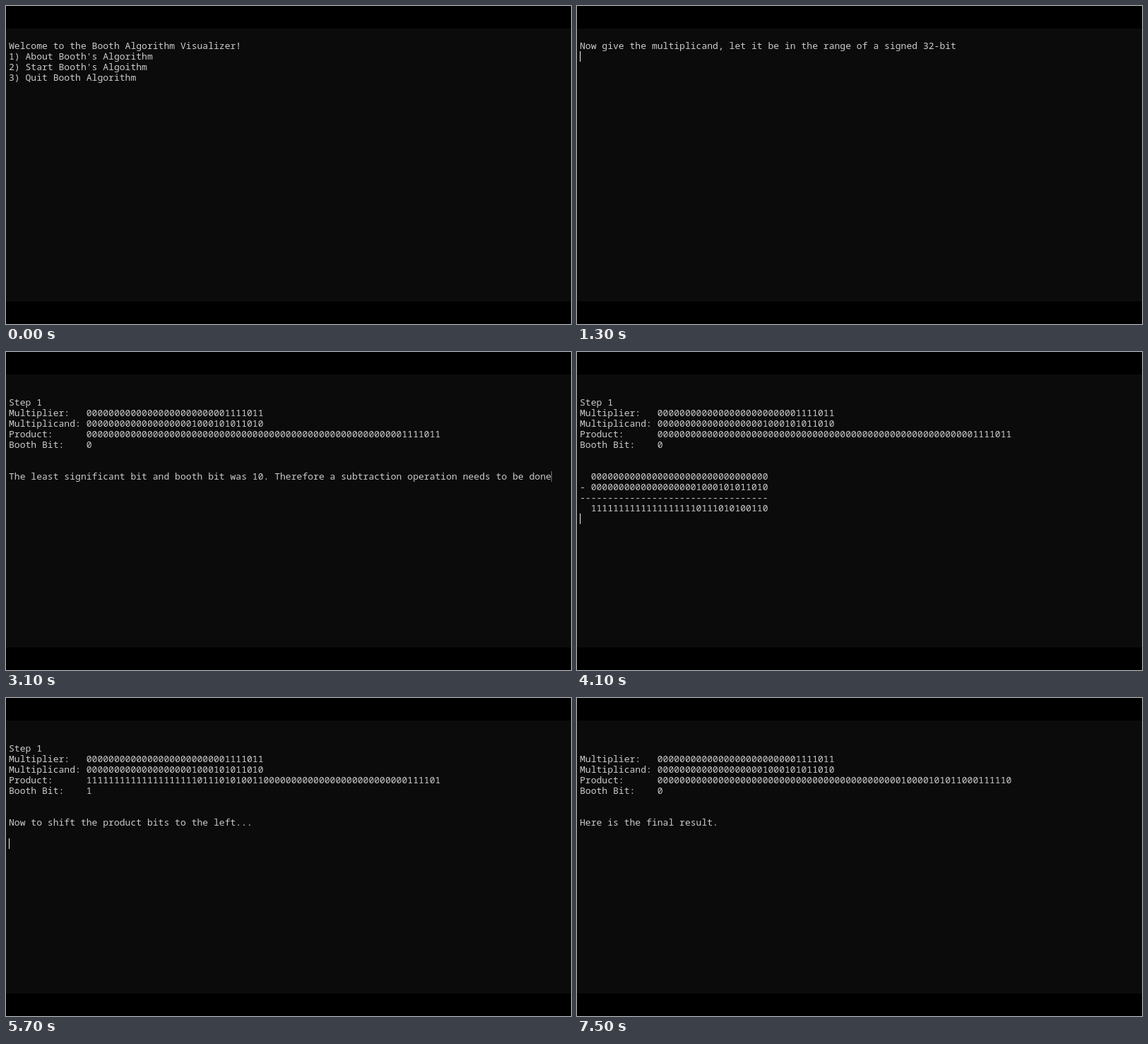
An HTML page for the animation above (7.7 s loop, 800 px wide and 451 px high).

```html
<!DOCTYPE html>
<html lang="en">
<head>
<meta charset="utf-8">
<title>Booth Algorithm Visualizer</title>
<style>
  html, body { margin: 0; width: 100%; height: 100%; overflow: hidden; background: #000; }
  #terminal { position: absolute; left: 0; top: 32px; width: 800px; height: 387px; background: #0b0b0b; }
  #screen {
    position: absolute; left: 4px; top: 16.5px; margin: 0; color: #ccc;
    font: 500 13.07px/15px "Noto Sans Mono", "DejaVu Sans Mono", monospace;
    font-variant-ligatures: none;
  }
  #cursor { position: absolute; width: 1px; height: 15px; background: #f2f2f2; }
</style>
</head>
<body>
<div id="terminal"><pre id="screen"></pre><div id="cursor"></div></div>
<script>
const LOOP = 7700, CELL = 7.842, ROW = 15;
const ON = 1, DIM = 0.45, OFF = 0;
const screen = document.getElementById('screen');
const cursor = document.getElementById('cursor');

const bits = (value, size) => BigInt.asUintN(size, value).toString(2).padStart(size, '0');
const multiplier = 123n, multiplicand = 4442n;
const subtracted = (-multiplicand << 32n) + multiplier;
const shifted = subtracted >> 1n;

const registers = (product, boothBit) =>
  `Multiplier:   ${bits(multiplier, 32)}
Multiplicand: ${bits(multiplicand, 32)}
Product:      ${bits(product, 64)}
Booth Bit:    ${boothBit}`;
const page = (title, product, boothBit, message) =>
  `\n${title}\n${registers(product, boothBit)}\n\n\n${message}`;

const menu = `Welcome to the Booth Algorithm Visualizer!
1) About Booth's Algorithm
2) Start Booth's Algoithm
3) Quit Booth Algorithm
`;
const prompt = (start, typed) => `${start}, let it be in the range of a signed 32-bit\n${typed}`;
const askMultiplier = typed => prompt('Give the multiplier', typed);
const askMultiplicand = typed => prompt('Now give the multiplicand', typed);
const bitCheck = 'The least significant bit and booth bit was ';
const shiftMessage = 'Now to shift the product bits to the left...';

const init = 'First, we have to initalize\n' + registers(multiplier, 0);
const step1 = page('Step 1', multiplier, 0,
  bitCheck + '10. Therefore a subtraction operation needs to be done');
const subtraction = page('Step 1', multiplier, 0,
  `  ${bits(0n, 32)}\n- ${bits(multiplicand, 32)}\n${'-'.repeat(34)}\n  ${bits(-multiplicand, 32)}\n`);
const replaced = page('Step 1', subtracted, 0,
  'The multiplicand has been subtracted from the left half of the product. Here it is now');
const shift1 = page('Step 1', shifted, 1, shiftMessage);
const step2 = page('Step 2', shifted, 1, bitCheck + '11. Therefore no operation');
const shift2 = page('Step 2', shifted >> 1n, 1, shiftMessage);
const final = page('', multiplier * multiplicand, 0, 'Here is the final result.');

// [start in ms, text, cursor strength]; the cursor follows the text
const timeline = [
  [0, menu, OFF], [600, menu + '2', ON],
  [700, askMultiplier(''), ON], [1000, askMultiplier('1'), ON],
  [1100, askMultiplier('12'), ON], [1200, askMultiplier('123'), ON],
  [1300, askMultiplicand(''), ON], [1500, askMultiplicand('4'), ON],
  [1700, askMultiplicand('44'), ON], [1900, askMultiplicand('4442'), ON],
  [2100, init, DIM], [2300, init, OFF], [2500, init, ON],
  [2700, step1, OFF], [2900, step1, ON], [3100, step1, DIM], [3300, step1, OFF],
  [3600, subtraction, ON], [3800, subtraction, OFF], [4000, subtraction, ON],
  [4200, replaced, ON], [4300, replaced, OFF], [4500, replaced, ON],
  [4700, shift1, ON], [5000, shift1, DIM], [5200, shift1, OFF],
  [5400, shift1, ON], [5500, shift1, DIM], [5600, shift1, OFF], [5700, shift1 + '\n\n', ON],
  [5800, step2, ON], [6100, step2, OFF], [6300, step2, ON], [6500, step2, OFF],
  [6600, shift2, ON], [6800, shift2, OFF],
  [6900, final + '\n\n\n\n', ON], [7100, final, ON], [7300, final, DIM], [7500, final, OFF]
];

let shown;
function draw(now) {
  const time = now % LOOP;
  const state = timeline.findLast(([start]) => start <= time) || timeline[0];
  if (state !== shown) {
    shown = state;
    const [, text, strength] = state;
    const lines = text.split('\n');
    // The leading space keeps a first blank line from being collapsed
    screen.textContent = text.startsWith('\n') ? ' ' + text : text;
    cursor.style.left = Math.floor(4 + lines.at(-1).length * CELL) + 'px';
    cursor.style.top = 17 + (lines.length - 1) * ROW + 'px';
    cursor.style.opacity = strength;
  }
}
function tick() {
  draw(performance.now());
  requestAnimationFrame(tick);
}
tick();
</script>
</body>
</html>
```
